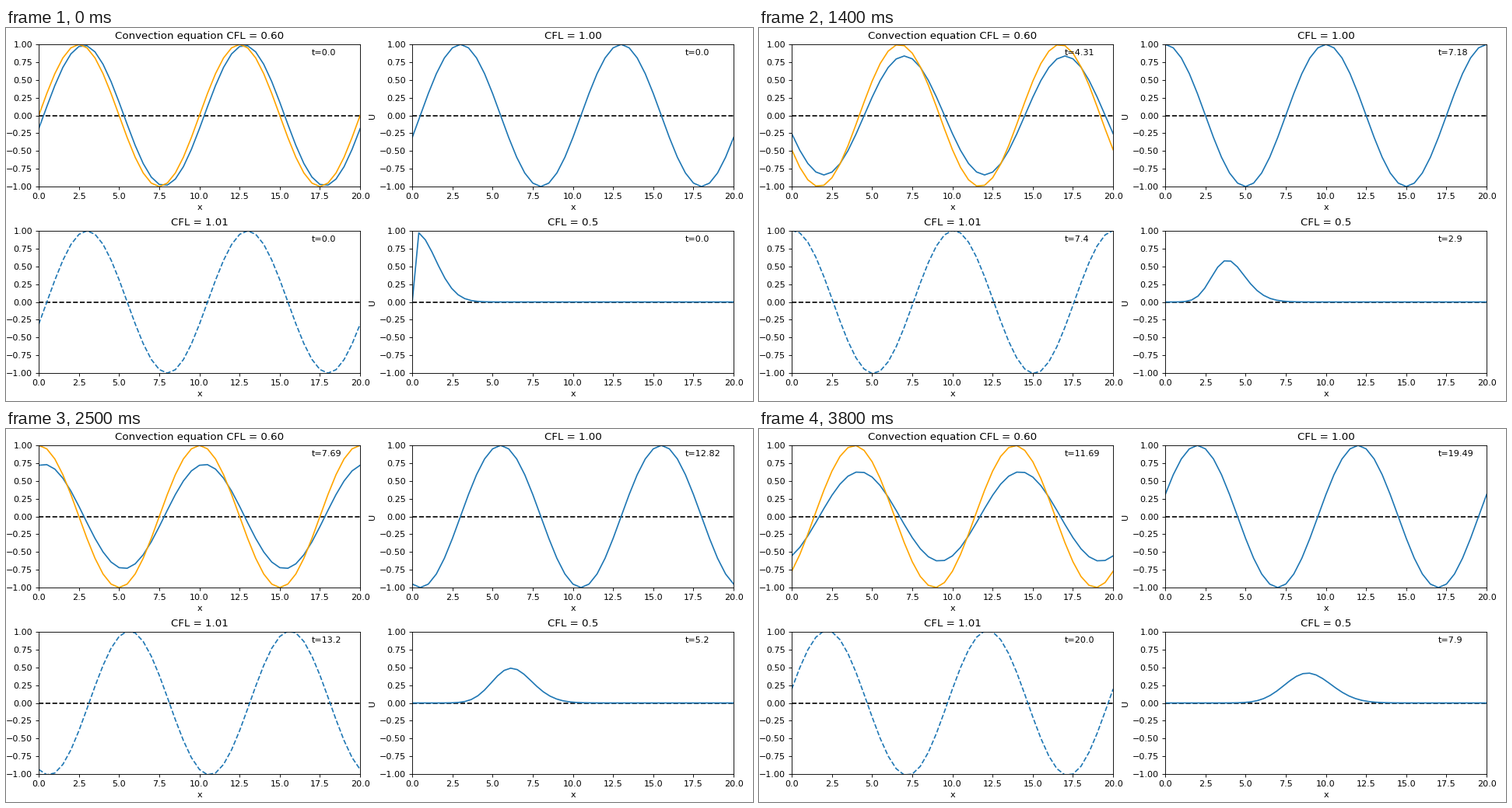
Write a matplotlib script that moves like this. It is 960 px wide and 480 px high and loops after 3900 ms.

```python
import numpy as np
import matplotlib.pyplot as plt
from matplotlib.animation import FuncAnimation

W, H, DPI = 960, 480, 80
FRAMES, INTERVAL = 39, 100
LENGTH, PERIOD = 20.0, 10.0
BLUE, ORANGE = "#1f77b4", "orange"

plt.rcParams["font.family"] = "DejaVu Sans"
plt.rcParams["font.size"] = 10


def wave(x):
    return np.sin(2 * np.pi * x / PERIOD)


def upwind(u, cfl, periodic):
    """Return the solution after 1, 2, ... FRAMES first-order upwind steps."""
    history = []
    for _ in range(FRAMES):
        u = u - cfl * (u - np.roll(u, 1))
        if not periodic:
            u[0] = 0.0
        history.append(u)
    return np.array(history)


def upwind_wave(cfl):
    # The last grid point repeats the first one.
    u = upwind(wave(x_wave[:-1]), cfl, periodic=True)
    return np.hstack([u, u[:, :1]])


def style(ax, title):
    ax.set_xlim(0, LENGTH)
    ax.set_ylim(-1, 1)
    ax.set_xticks(np.arange(0, 20.1, 2.5))
    ax.set_yticks(np.arange(-1, 1.01, 0.25))
    ax.set_title(title)
    ax.set_xlabel("x")
    ax.set_ylabel("U")
    ax.axhline(0, color="black", linestyle="--", linewidth=1.5, zorder=1.5)


x_wave = np.linspace(0, LENGTH, 41)
x_pulse = np.linspace(0, LENGTH, 50)
pulse = np.exp(-x_pulse**2 / 3)

# title, grid, solutions, line style, clock step, clock decimals
panels = [
    ("Convection equation CFL = 0.60", x_wave, upwind_wave(0.6), "-", 12 / 39, 2),
    ("CFL = 1.00", x_wave, upwind_wave(1.0), "-", 20 / 39, 2),
    ("CFL = 1.01", x_wave, upwind_wave(1.01), "--", 20 / 38, 1),
    ("CFL = 0.5", x_pulse, upwind(pulse, 0.5, periodic=False), "-", 10 / 48, 1),
]

fig, axes = plt.subplots(2, 2, figsize=(W / DPI, H / DPI), dpi=DPI)
fig.subplots_adjust(
    left=42.1 / W, right=935.1 / W, wspace=67 / 413,
    top=1 - 21.05 / H, bottom=1 - 444.05 / H, hspace=57 / 183,
)

lines, clocks = [], []
for ax, (title, x, u, dash, _, _) in zip(axes.flat, panels):
    style(ax, title)
    lines += ax.plot(x, u[0], dash, color=BLUE, linewidth=1.5)
    clocks.append(ax.text(17, 0.85, "t=0.0"))
exact, = axes[0, 0].plot(x_wave, wave(x_wave), color=ORANGE, linewidth=1.5)


def update(n):
    for line, clock, (_, _, u, _, dt, digits) in zip(lines, clocks, panels):
        line.set_ydata(u[n])
        clock.set_text(f"t={round(n * dt, digits)}")
    exact.set_ydata(wave(x_wave - 0.3 * n))
    return [*lines, *clocks, exact]


anim = FuncAnimation(fig, update, frames=FRAMES, interval=INTERVAL,
                     repeat=True, repeat_delay=0, blit=False)
plt.show()
```
